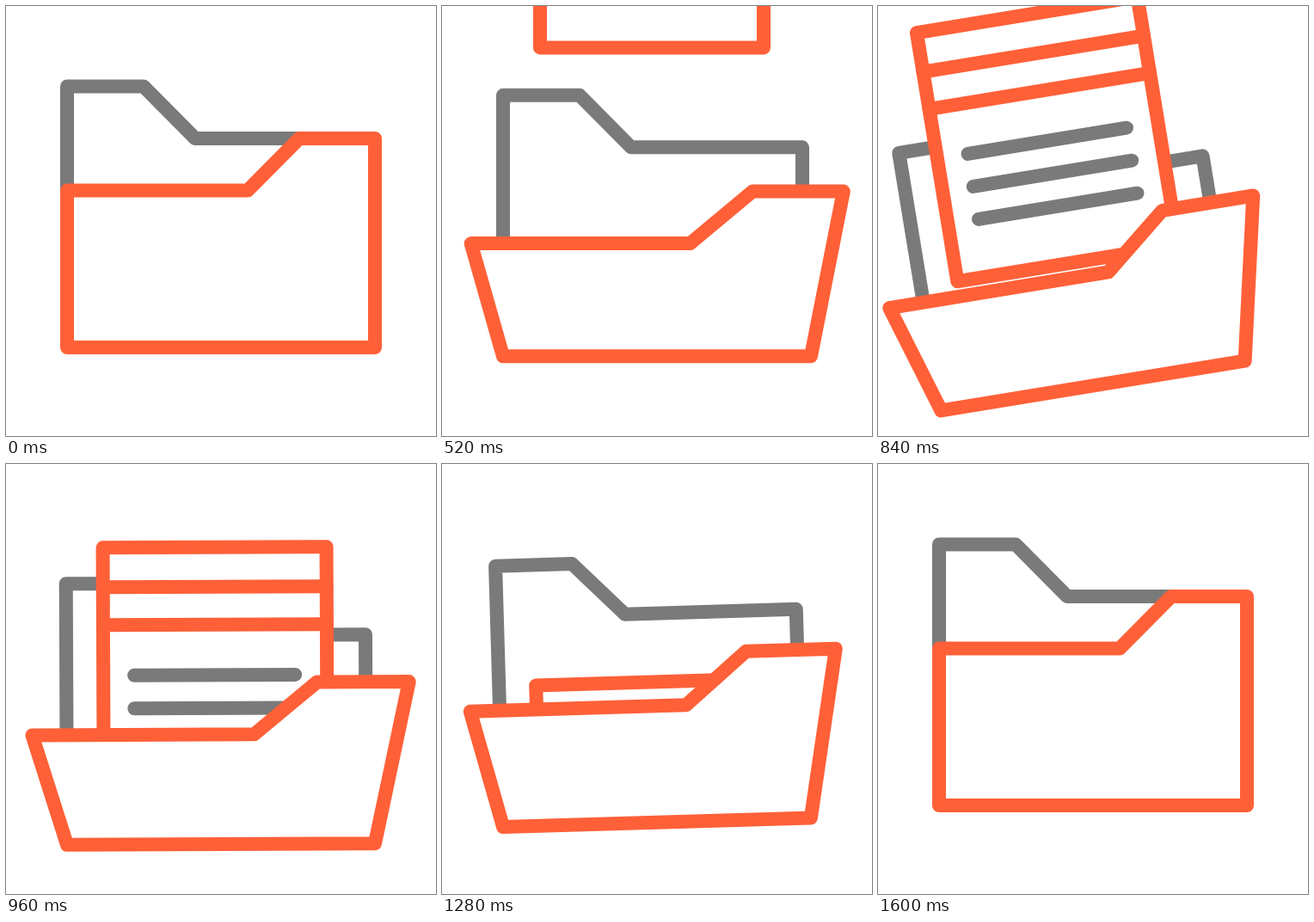
These frames come from a looping animation (500 by 500 pixels, 2000 ms). An HTML page:

```html
<!DOCTYPE html>
<html lang="en">
<head>
<meta charset="utf-8">
<title>Folder</title>
<style>
  html, body { margin: 0; width: 100%; height: 100%; overflow: hidden; background: #fff; }
  svg { display: block; width: 100%; height: 100%; }
  .ink { fill: #fff; stroke: #ff6038; stroke-width: 16; stroke-linejoin: round; stroke-linecap: round; }
  .gray { stroke: #7a7a7a; }
  .open { fill: none; }
</style>
</head>
<body>
<svg viewBox="0 0 500 500">
  <clipPath id="mouth"><rect x="-200" y="-600" width="900" height="990"/></clipPath>
  <g id="folder">
    <path class="ink gray open" d="M71 388V93.5H160L220 154H419V388"/>
    <g clip-path="url(#mouth)">
      <g id="paper">
        <path class="ink" d="M114 0H374V293H114Z"/>
        <path class="ink open" d="M114 46H374M114 90H374"/>
        <path class="ink gray open" d="M150 148.5H337M150 187H337M150 225.5H337"/>
      </g>
    </g>
    <path id="front" class="ink"/>
  </g>
</svg>
<script>
  const LOOP = 2000, STEP = 40, END = 1600;
  const get = id => document.getElementById(id);
  const folder = get('folder'), paper = get('paper'), front = get('front');

  // Eased rise from 0 to 1 between two times.
  function ramp(t, from, to) {
    const u = Math.min(1, Math.max(0, (t - from) / (to - from)));
    return (1 - Math.cos(Math.PI * u)) / 2;
  }

  // Tips over to a peak, then rocks back and forth with a fading swing.
  function tilt(t) {
    const peak = 860, half = 205, fade = 247;
    if (t < peak) return -9.4 * ramp(t, 555, peak);
    const s = t - peak;
    const swing = Math.cos(Math.PI * s / half) * Math.exp(-s / fade);
    return -9.4 * swing * (1 - ramp(t, 1300, END));
  }

  // Opens, gives way a little under the paper, then closes.
  function flap(t) {
    const give = ramp(t, 1060, 1120) - ramp(t, 1120, 1180);
    return ramp(t, 20, 620) - 0.11 * give - ramp(t, 1175, END);
  }

  const sink = t => 45 * (ramp(t, 355, 875) - ramp(t, 1066, 1463));
  const drop = t => -311 + 568 * ramp(t, 288, 1428);

  function draw(t) {
    const o = flap(t), y = 55 * o;
    front.setAttribute('d',
      `M${71 - 40 * o} ${214.5 + y}L${281 + 8 * o} ${214.5 + y}` +
      `L${341 + 21.5 * o} ${154 + y}H${429 + 40.5 * o}L429 397H71Z`);
    paper.setAttribute('transform', `translate(0 ${drop(t)})`);
    folder.setAttribute('transform', `translate(0 ${sink(t)}) rotate(${tilt(t)} 250 397)`);
  }

  const start = performance.now();
  function tick() {
    const t = (performance.now() - start) % LOOP;
    draw(Math.floor(t / STEP) * STEP);
    requestAnimationFrame(tick);
  }
  draw(0);
  requestAnimationFrame(tick);
</script>
</body>
</html>
```
